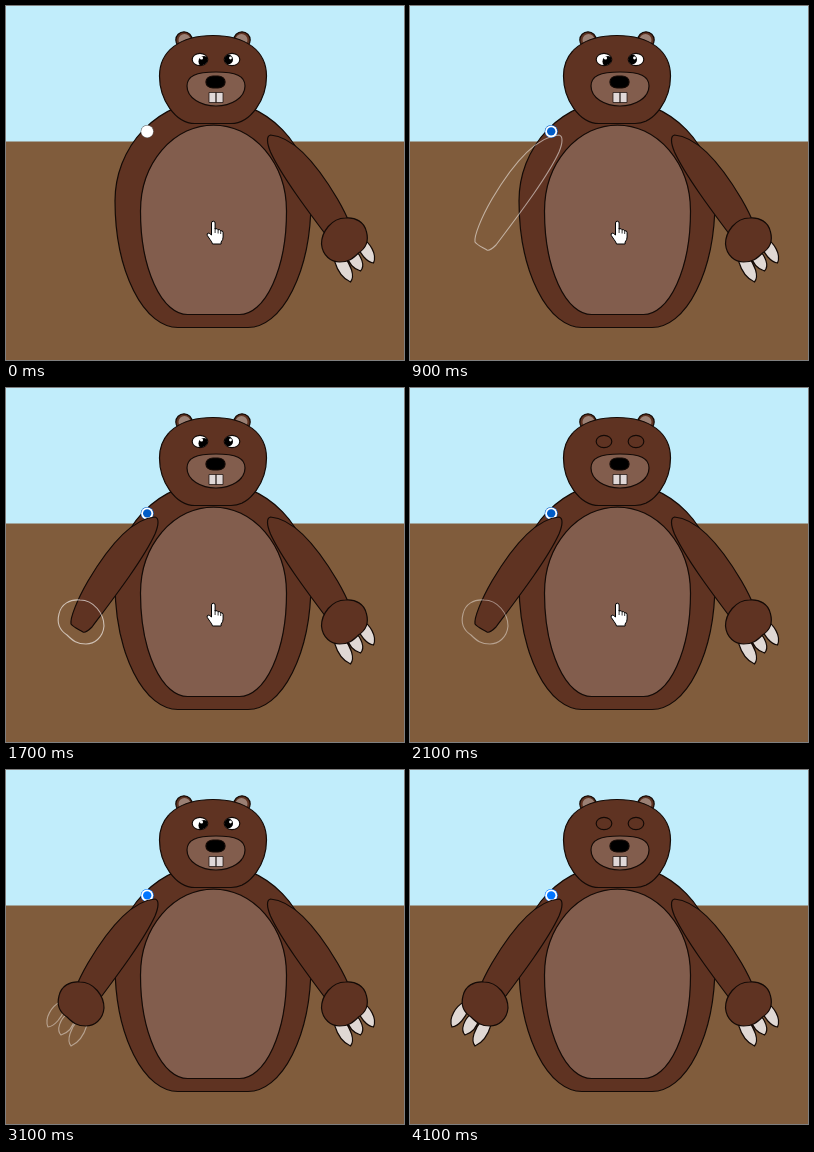
Write an HTML page that moves like this. It is 398x354 px and loops after 4.2 s.

```html
<!DOCTYPE html>
<html lang="en">
<head>
<meta charset="utf-8">
<title>Bear</title>
<style>
  html, body { margin: 0; width: 100%; height: 100%; overflow: hidden; }
  svg { display: block; }
  .fur { fill: #5f3322; }
  .skin { fill: #825d4d; }
  .claw { fill: #e0d8d4; }
  .line { stroke: #140a06; stroke-width: 1.2; }
  .outline { fill: none; stroke: #fff; stroke-width: 1.1; }
</style>
</head>
<body>
<svg width="398" height="354" viewBox="0 0 398 354">
  <defs>
    <path id="arm" d="M149 129C153 130 153 136 149 146C137 172 107 211 86 239C82 243 79 245 77 244C72 241 67 239 65 236C64 230 71 212 82 193C98 166 123 131 149 129Z"/>
    <path id="paw" d="M53 226C55 216 64 211 74 212C88 212 98 226 98 238C97 250 88 256 80 256C71 256 67 253 61 247C55 243 50 237 53 226Z"/>
    <path id="claws" d="M54 232C46 236 38 248 42 257C49 256 56 247 58 240M62 243C54 249 50 260 55 265C62 263 67 257 69 249M72 250C65 258 60 270 65 276C72 273 78 265 81 255"/>
    <clipPath id="eyes"><ellipse cx="194" cy="53.5" rx="7.5" ry="6"/><ellipse cx="226" cy="53.5" rx="7.5" ry="6"/></clipPath>
  </defs>

  <rect width="398" height="354" fill="#805c3c"/>
  <rect width="398" height="135.5" fill="#c1edfb"/>

  <g class="line">
    <path class="fur" d="M109 195A98 101 0 0 1 305 195A63 127 0 0 1 242 321.5H172A63 127 0 0 1 109 195Z"/>
    <path class="skin" d="M134.5 205A73 86 0 0 1 280.5 205A47 103 0 0 1 233.5 308.5H181.5A47 103 0 0 1 134.5 205Z"/>
    <g class="fur">
      <circle cx="178" cy="34" r="8.2"/><circle cx="236" cy="34" r="8.2"/>
    </g>
    <g fill="#9b8074" stroke="none">
      <circle cx="178.5" cy="34" r="6"/><circle cx="235.5" cy="34" r="6"/>
    </g>
    <path class="fur" d="M153.5 70C153.5 45 174 29.5 207 29.5S260.5 45 260.5 70C260.5 93 245 117.5 225 117.5H189C169 117.5 153.5 93 153.5 70Z"/>
    <path class="skin" d="M181 80C181 70 190 66 210 66S239 70 239 80C239 92 225 100 210 100S181 92 181 80Z"/>
    <rect x="200" y="70" width="19" height="12" rx="7" ry="5.5" fill="#000"/>
    <path d="M203 86.5h7v10h-7zM210 86.5h7v10h-7z" fill="#e0d8d8" stroke-width=".7"/>
    <g id="lids" fill="#fff">
      <ellipse cx="194" cy="53.5" rx="7.8" ry="6.2"/><ellipse cx="226" cy="53.5" rx="7.8" ry="6.2"/>
    </g>
  </g>
  <g id="pupils" clip-path="url(#eyes)">
    <circle cx="198" cy="55.5" r="5.5"/><circle cx="222" cy="53.5" r="5"/>
    <g fill="#fff"><circle cx="195.5" cy="52" r="1.6"/><circle cx="224.5" cy="52" r="1.4"/></g>
  </g>

  <g class="line" transform="matrix(-1 0 0 1 413.5 0)">
    <use href="#claws" class="claw" x="4"/>
    <use href="#arm" class="fur"/>
    <use href="#paw" class="fur"/>
  </g>

  <g id="radio">
    <circle cx="141.2" cy="125.4" r="6.5"/>
    <circle cx="141.2" cy="125.4" r="6" fill="#fff"/>
    <circle id="dot" cx="141.2" cy="125.4" r="4.2"/>
  </g>
  <use id="clawsPart" href="#claws"/>
  <use id="armPart" href="#arm"/>
  <use id="pawPart" href="#paw"/>

  <g id="cursor" fill="#fff" stroke="#000" stroke-linejoin="round">
    <path d="M205.5 229V217a1.8 1.8 0 0 1 3.6 0V223q2.5-1 3 .8q2-.6 2.6.9q2.4-.3 2.4 2V231q0 3-2 5V238H206.5q-.5-2-2.5-4.5L201.3 229.5q-.8-2 .8-2.4q1.6 0 3.4 1.9z"/>
    <path d="M209.1 222v5M212.1 223.500v4M214.700 224.500v3.500" fill="none" stroke-width=".8"/>
  </g>
</svg>
<script>
const LOOP = 4200, STEP = 1000, CHECKED = 600, LEAVE = 2800, GONE = 3050;
const $ = id => document.getElementById(id);
const show = (el, on) => el.setAttribute('visibility', on ? 'visible' : 'hidden');

const parts = [
  { el: $('armPart'), start: 700, fill: 'fur' },
  { el: $('pawPart'), start: 1700, fill: 'fur' },
  { el: $('clawsPart'), start: 2700, fill: 'claw' }
];

// Each part shows as a fading outline for one step, then becomes solid.
function drawPart({ el, start, fill }, t) {
  const p = (t - start) / STEP;
  const solid = p >= 1;
  show(el, p >= 0);
  el.setAttribute('class', solid ? 'line ' + fill : 'outline');
  el.setAttribute('opacity', solid ? 1 : 0.62 - 0.48 * Math.max(p, 0));
}

function draw(t) {
  parts.forEach(part => drawPart(part, t));

  const blink = t >= 100 && (t - 100) % 2000 < 200;
  $('lids').setAttribute('fill', blink ? '#5f3322' : '#fff');
  show($('pupils'), !blink);

  const checked = t >= CHECKED;
  const blue = t < 3000 ? '#005cc8' : '#0075ff';
  $('radio').setAttribute('fill', checked ? blue : '#666');
  show($('dot'), checked);

  const away = Math.max(0, (t - LEAVE) / 200);
  $('cursor').setAttribute('transform', `translate(${168 * away ** 2} 0)`);
  show($('cursor'), t < GONE);
}

const begin = performance.now();
function tick() {
  draw((performance.now() - begin) % LOOP);
  requestAnimationFrame(tick);
}
tick();
</script>
</body>
</html>
```
